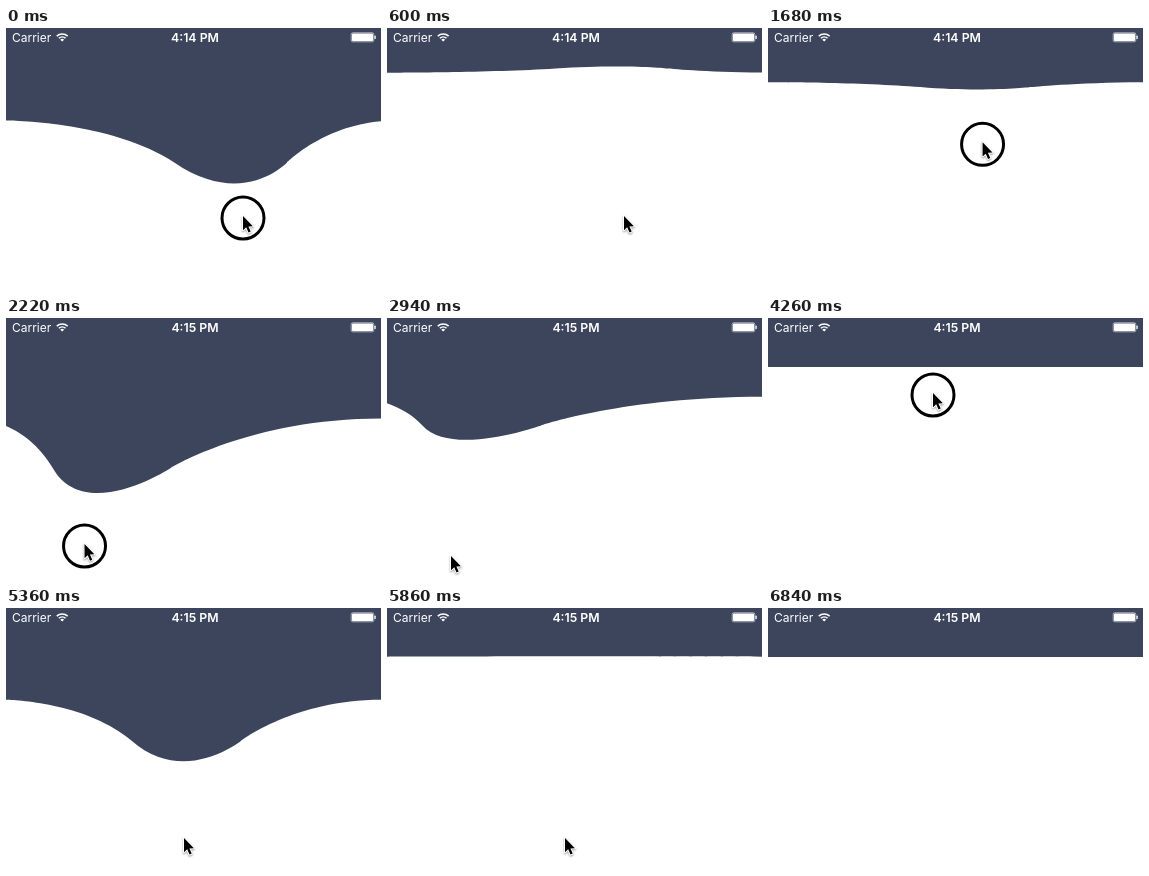
Recreate the animation shown at these times as an HTML page with a canvas. Size 375x262 px, loop 9780 ms.

```html
<!DOCTYPE html>
<html lang="en">
<head>
<meta charset="utf-8">
<title>Elastic header</title>
<style>
html, body { margin: 0; width: 100%; height: 100%; overflow: hidden; background: #fff; }
canvas { display: block; width: 375px; height: 262px; }
</style>
</head>
<body>
<canvas id="stage"></canvas>
<script>
const W = 375, H = 262, LOOP = 9780, REST = 49;
const BAR = '#3c455c';
const canvas = document.getElementById('stage');
const ctx = canvas.getContext('2d');
const ratio = window.devicePixelRatio || 1;
canvas.width = W * ratio;
canvas.height = H * ratio;

const ease = {
  inOut: u => u * u * (3 - 2 * u),
  in: u => u * u,
  out: u => 1 - Math.pow(1 - u, 2.64)
};

// Pointer moves: start, end, from, to, easing
const moves = [
  [1120, 1440, [237, 190], [218, 104], ease.inOut],
  [1600, 1680, [218, 104], [215, 116], ease.in],
  [1680, 2600, [215, 116], [64, 240], ease.out],
  [3000, 3720, [64, 240], [165, 77], ease.inOut],
  [4420, 4900, [165, 77], [178, 232], ease.inOut],
  [6720, 6840, [178, 232], [216, 270], ease.in]
];

// Touches: press and release time, start height, pull factor, delay before the spring
const touches = [
  { down: 0, up: 160, y: 81, pull: 1, lag: 30 },
  { down: 1460, up: 2780, y: 104, pull: 1.04, lag: 40 },
  { down: 4260, up: 5240, y: 77, pull: 1, lag: 30 }
];

function pointer(t) {
  let pos = moves[0][2];
  for (const [start, end, from, to, fn] of moves) {
    if (t < start) break;
    const k = fn(Math.min(1, (t - start) / (end - start)));
    pos = from.map((v, i) => v + (to[i] - v) * k);
  }
  return pos;
}

// Underdamped spring, damping ratio 0.57, from 1 to 0
function spring(ms) {
  if (ms <= 0) return 1;
  if (ms >= 1080) return 0;
  const a = 8.73 * ms / 1000, d = 0.694;
  return Math.exp(-d * a) * (Math.cos(a) + d * Math.sin(a));
}

function drawHeader(x, pull) {
  const wave = pull * 0.6, base = REST + pull - wave;
  const shift = (x - W / 2) * 0.28;
  const left = Math.min(shift, 0), right = Math.max(W + shift, W);
  const lw = x - left, rw = right - x;
  const side = base + wave * 0.64, r1 = right - rw * 0.71;
  ctx.fillStyle = BAR;
  ctx.beginPath();
  ctx.moveTo(left, 0);
  ctx.lineTo(left, base);
  ctx.bezierCurveTo(left, base, left + lw * 0.44, base, left + lw * 0.71, side);
  ctx.bezierCurveTo(x, base + wave * 1.36, r1, side, r1, side);
  ctx.bezierCurveTo(r1, side, right - rw * 0.44, base, right, base);
  ctx.lineTo(right, 0);
  ctx.fill();
}

function drawStatus(t) {
  ctx.fillStyle = ctx.strokeStyle = '#fff';
  ctx.textBaseline = 'alphabetic';
  ctx.textAlign = 'left';
  ctx.font = '400 12px Inter, sans-serif';
  ctx.fillText('Carrier', 6, 14);
  ctx.textAlign = 'center';
  ctx.font = '600 12.3px Inter, sans-serif';
  ctx.fillText(t < 1900 ? '4:14 PM' : '4:15 PM', 189, 14);

  // Wi-Fi
  const a0 = -Math.PI * 0.75, a1 = -Math.PI * 0.25;
  ctx.lineWidth = 1.5;
  for (const r of [4.7, 7.7]) {
    ctx.beginPath();
    ctx.arc(56.2, 13.6, r, a0, a1);
    ctx.stroke();
  }
  ctx.beginPath();
  ctx.moveTo(56.2, 13.6);
  ctx.arc(56.2, 13.6, 2.7, a0, a1);
  ctx.fill();

  // Battery
  ctx.lineWidth = 0.6;
  ctx.beginPath();
  ctx.roundRect(345.2, 4.8, 22.6, 9, 1.6);
  ctx.stroke();
  ctx.beginPath();
  ctx.roundRect(346, 5.6, 21, 7.4, 0.8);
  ctx.fill();
  ctx.beginPath();
  ctx.roundRect(368.4, 7.6, 1.3, 3.4, 0.6);
  ctx.fill();
}

function drawRing(x, y) {
  ctx.strokeStyle = '#000';
  ctx.lineWidth = 3;
  ctx.beginPath();
  ctx.arc(x, y, 21, 0, Math.PI * 2);
  ctx.stroke();
}

function drawCursor(x, y) {
  ctx.save();
  ctx.translate(x, y - 2);
  ctx.beginPath();
  [[0, 0], [0, 14.2], [3.2, 11.3], [5.5, 16.6], [7.7, 15.6], [5.4, 10.4], [9.9, 10.2]]
    .forEach(p => ctx.lineTo(...p));
  ctx.closePath();
  ctx.lineJoin = 'round';
  ctx.strokeStyle = '#fff';
  ctx.lineWidth = 2;
  ctx.shadowColor = 'rgba(0,0,0,.4)';
  ctx.shadowBlur = 2 * ratio;
  ctx.shadowOffsetY = ratio;
  ctx.stroke();
  ctx.shadowColor = 'transparent';
  ctx.fillStyle = '#000';
  ctx.fill();
  ctx.restore();
}

function draw(t) {
  ctx.setTransform(ratio, 0, 0, ratio, 0, 0);
  ctx.fillStyle = '#fff';
  ctx.fillRect(0, 0, W, H);
  const [x, y] = pointer(t);
  const touch = touches.filter(p => p.down <= t).pop();
  const [tx, ty] = pointer(Math.min(t, touch.up));
  const pull = Math.max(0, ty - touch.y) * touch.pull;
  drawHeader(tx, pull * spring(t - touch.up - touch.lag));
  drawStatus(t);
  if (t < touch.up) drawRing(x, y);
  if (t < 6840) drawCursor(x, y);
}

const begin = performance.now();
function tick() {
  draw((performance.now() - begin) % LOOP);
  requestAnimationFrame(tick);
}
tick();
</script>
</body>
</html>
```
